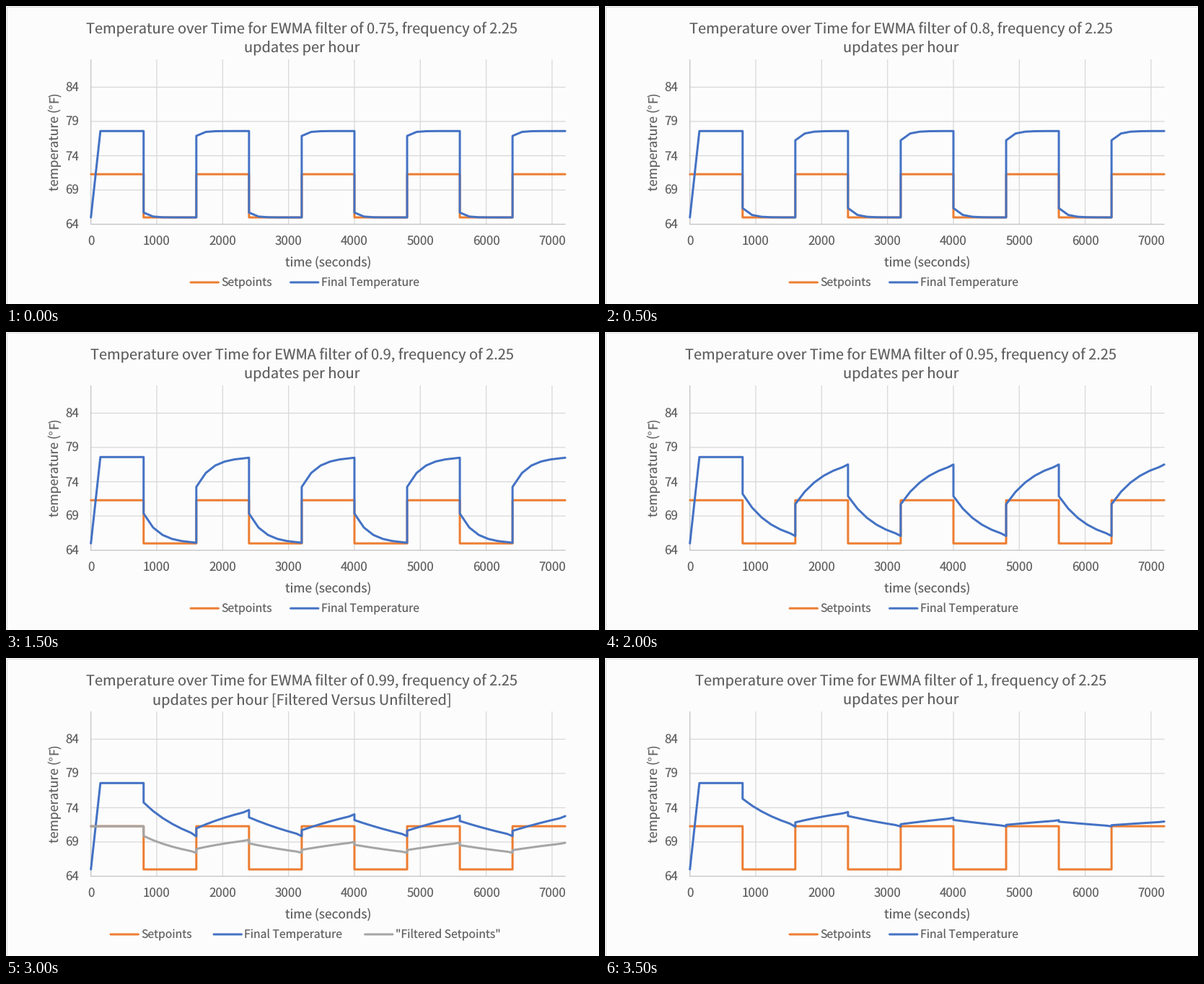
Recreate the animation shown at these times as a matplotlib script. Size 822x413 px, loop 4000 ms.

```python
import matplotlib.pyplot as plt
from matplotlib.animation import FuncAnimation

W, H, DPI = 822, 413, 100
FONT = "Noto Sans CJK JP"
BACK, GRID, AXIS, INK = "#fcfcfc", "#d9d9d9", "#c4c4c4", "#606060"
ORANGE, BLUE, GRAY = "#ed7d31", "#4472c4", "#a5a5a5"

FILTERS = [0.75, 0.8, 0.85, 0.9, 0.95, 0.975, 0.99, 1]
LOW, HIGH, HOT = 65.0, 71.3, 77.6
HALF, END = 800, 7200            # seconds per setpoint level, total
SAMPLE = 144                     # seconds between plotted points
WARMUP, JUMP, STRIDE = 45, 10, 6  # filter updates per stage
LEFT, RIGHT, TOP, BOTTOM = 117.7, 775.2, 74.5, 302.5

plt.rcParams["text.hinting"] = "none"
fig = plt.figure(figsize=(W / DPI, H / DPI), dpi=DPI, facecolor=BACK)
ax = fig.add_axes([0, 0, 1, 1])
ax.set_xlim(0, W)
ax.set_ylim(H, 0)
ax.axis("off")


def px(t):
    return LEFT + t * (RIGHT - LEFT) / END


def py(temp):
    return BOTTOM - (temp - 64) * 9.5


def points(px_size):
    return px_size * 72 / DPI


def line(xs, ys, color, width=3.0, z=3):
    return ax.plot(xs, ys, color=color, lw=points(width), zorder=z, snap=False,
                   solid_joinstyle="round", solid_capstyle="round")[0]


def label(x, y, text, size, ha="center", rotation=0, font=FONT):
    return ax.text(x, y, text, fontsize=points(size), family=font, color=INK,
                   ha=ha, va="baseline", rotation=rotation,
                   rotation_mode="anchor")


def filtered(a):
    """Weighted running mean of the square wave, from 0 (low) to 1 (high)."""
    total = share = sum(a ** i for i in range(WARMUP))
    times, values = [HALF], [1.0]
    for start in range(HALF, END, HALF):
        high = (start // HALF) % 2 == 0
        for k in range(7):
            for _ in range(STRIDE if k else JUMP):
                share = share * a + high
                total = total * a + 1
            times.append(start + (SAMPLE * k if k < 6 else HALF))
            values.append(share / total)
    return times, values


def setpoints():
    times, temps = [], []
    for i in range(END // HALF):
        times += [i * HALF, (i + 1) * HALF]
        temps += [LOW if i % 2 else HIGH] * 2
    return times, temps


def place(artist, times, temps):
    artist.set_data([px(t) for t in times], [py(v) for v in temps])


# frame, grid and axes
ax.plot([0.5, W - 0.5, W - 0.5, 0.5, 0.5], [0.5, 0.5, H - 0.5, H - 0.5, 0.5],
        color=GRID, lw=points(1))
for temp in range(69, 85, 5):
    line([LEFT, RIGHT], [py(temp)] * 2, GRID, 1.3, 1)
for t in range(1000, 7001, 1000):
    line([px(t)] * 2, [TOP, BOTTOM], GRID, 1.3, 1)
line([LEFT, RIGHT], [BOTTOM] * 2, AXIS, 1.3, 2)
line([LEFT, LEFT], [TOP, BOTTOM], AXIS, 1.3, 2)

for temp in range(64, 85, 5):
    label(101.5, py(temp) + 6, str(temp), 17, "right")
for t in range(0, 7001, 1000):
    label(px(t), 332, str(t), 17)
label(446.5, 361, "time (seconds)", 17.4)
label(72.5, 256, "temperature (", 17.6, "left", 90)
label(72.5, 138, "°", 17.6, "center", 90, "Liberation Sans")
label(72.5, 118, "F)", 17.6, "right", 90)

title = [label(410.3, y, "", 20) for y in (37, 64.5)]

orange = line([], [], ORANGE, z=3)
blue = line([], [], BLUE, z=4)
gray = line([], [], GRAY, z=5)
place(orange, *setpoints())

legend = []
for name, color in (("Setpoints", ORANGE), ("Final Temperature", BLUE),
                    ('"Filtered Setpoints"', GRAY)):
    legend.append((line([], [], color), label(0, 388.5, name, 15.75, "left")))


def draw(i):
    a = FILTERS[i]
    compare = a == 0.99
    title[0].set_text("Temperature over Time for EWMA filter of "
                      f"{a}, frequency of 2.25")
    title[1].set_text("updates per hour"
                      + (" [Filtered Versus Unfiltered]" if compare else ""))

    times, values = filtered(a)
    place(blue, [0, SAMPLE] + times,
          [LOW, HOT] + [LOW + (HOT - LOW) * v for v in values])
    place(gray, [0] + times,
          [HIGH] + [LOW + (HIGH - LOW) * v for v in values])
    gray.set_visible(compare)

    starts = (145, 288, 497.5) if compare else (256, 394.5, 0)
    for k, (key, text) in enumerate(legend):
        key.set_data([starts[k], starts[k] + 38.5], [383, 383])
        text.set_x(starts[k] + 42)
        for part in (key, text):
            part.set_visible(compare or k < 2)
    return []


anim = FuncAnimation(fig, draw, frames=len(FILTERS), interval=500,
                     repeat=True, repeat_delay=0, blit=False)
plt.show()
```
